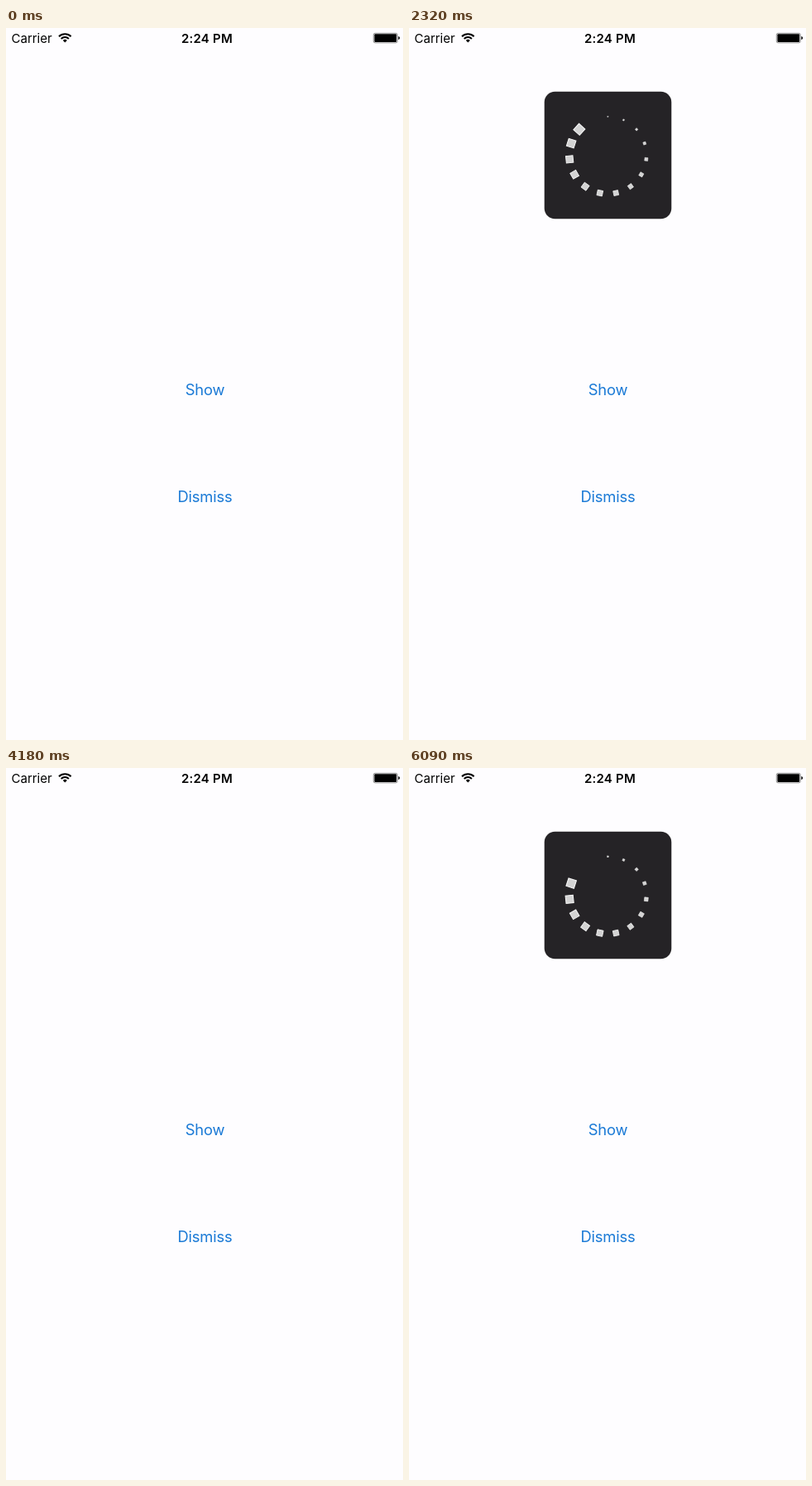
Recreate the animation shown at these times as an HTML page. Size 480x859 px, loop 6130 ms.

```html
<!DOCTYPE html>
<html lang="en">
<head>
<meta charset="utf-8">
<title>Loading indicator</title>
<style>
  html, body { margin: 0; width: 100%; height: 100%; overflow: hidden; background: #fefdff; }
  svg { display: block; width: 100%; height: 100%; }
  text { font-family: Inter, Roboto, sans-serif; font-size: 15px; }
  .button { font-size: 18.4px; letter-spacing: -.2px; fill: #1b7ad6; text-anchor: middle; }
  .clock { font-weight: 600; letter-spacing: .2px; text-anchor: middle; }
</style>
</head>
<body>
<svg viewBox="0 0 480 859">
  <text x="6.5" y="17.5">Carrier</text>
  <g transform="translate(71.3 17.6)">
    <path d="M0 0L-2.5 -2.5A3.5 3.5 0 0 1 2.5 -2.5Z"/>
    <path d="M-4.6 -4.6A6.5 6.5 0 0 1 4.6 -4.6M-7.3 -7.3A10.3 10.3 0 0 1 7.3 -7.3"
          fill="none" stroke="#000" stroke-width="2"/>
  </g>
  <text class="clock" x="243" y="17.5">2:24 PM</text>
  <rect x="444.3" y="6.3" width="29" height="11.6" rx="2" fill="#fefdff" stroke="#777" stroke-width=".8"/>
  <rect x="445.4" y="7.3" width="26.8" height="9.6" rx="1"/>
  <path d="M474.4 10q1.8 .6 1.8 2.1t-1.8 2.1z"/>

  <text class="button" id="show" x="240.5" y="443.4">Show</text>
  <text class="button" id="dismiss" x="240.5" y="572.4">Dismiss</text>

  <g id="panel" transform="translate(240.5 153.5)">
    <rect x="-76.8" y="-76.8" width="153.6" height="153.6" rx="12.8" fill="#252326"/>
  </g>
</svg>
<script>
const LOOP = 6130, COUNT = 15, SPIN = 1500, RADIUS = 46.6, SIDE = 11.5, END_SCALE = .04;
const FADE = 440, DISMISS_AT = 3620;
// Panel visibility, and the moment its first square begins to shrink
const shows = [
  { on: 1000, off: DISMISS_AT, start: 948 },
  { on: 4820, off: LOOP, start: 4820 }
];

const find = id => document.getElementById(id);
const panel = find('panel'), showButton = find('show'), dismissButton = find('dismiss');

const squares = Array.from({ length: COUNT }, () => {
  const square = document.createElementNS('http://www.w3.org/2000/svg', 'rect');
  const side = SIDE - 1.2;
  const attrs = { x: -side / 2, y: -side / 2, width: side, height: side,
                  fill: '#d3d3d3', stroke: '#f4f4f4', 'stroke-width': 1.2 };
  for (const name in attrs) square.setAttribute(name, attrs[name]);
  return panel.appendChild(square);
});

// A tapped title drops to 20% opacity and eases back
function titleOpacity(t, taps) {
  const tap = taps.find(at => t >= at && t < at + FADE);
  if (tap === undefined) return 1;
  const p = (t - tap) / FADE;
  return .2 + .8 * p * p * (3 - 2 * p);
}

function draw() {
  const t = performance.now() % LOOP;
  const current = shows.find(s => t >= s.on && t < s.off);
  panel.style.display = current ? '' : 'none';
  showButton.style.opacity = titleOpacity(t, shows.map(s => s.on));
  dismissButton.style.opacity = titleOpacity(t, [DISMISS_AT]);

  if (current) squares.forEach((square, i) => {
    const age = t - current.start - i * SPIN / COUNT;
    const scale = age < 0 ? 0 : 1 - (1 - END_SCALE) * (age % SPIN) / SPIN;
    square.setAttribute('transform',
      `rotate(${i * 360 / COUNT}) translate(0 ${-RADIUS}) scale(${scale})`);
  });
  requestAnimationFrame(draw);
}
draw();
</script>
</body>
</html>
```
